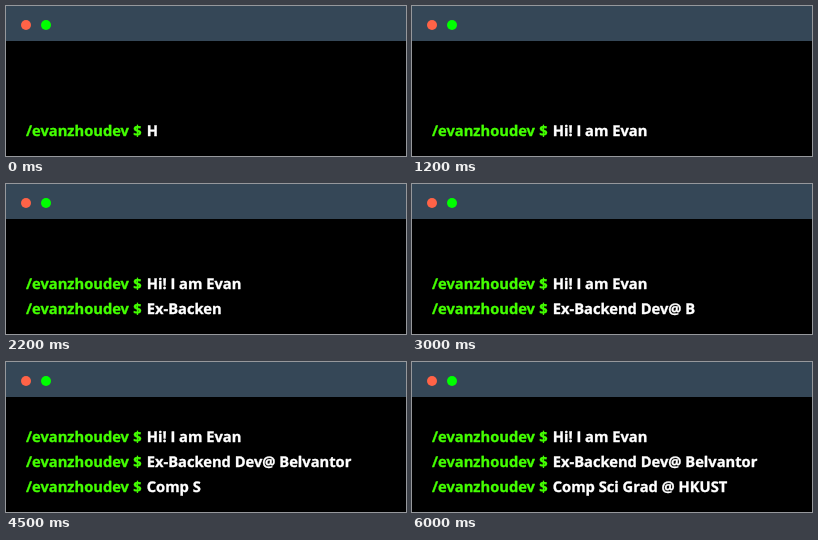
Recreate the animation shown at these times as an HTML page with a canvas. Size 400x150 px, loop 7200 ms.

```html
<!DOCTYPE html>
<html lang="en">
<head>
<meta charset="utf-8">
<title>Terminal</title>
<style>
  html, body { margin: 0; width: 100%; height: 100%; overflow: hidden; background: #000; }
  canvas { display: block; }
</style>
</head>
<body>
<canvas id="stage" width="400" height="150"></canvas>
<script>
const ctx = document.getElementById('stage').getContext('2d');

const LOOP = 7200;
const TICK = 100;
const LINE_HEIGHT = 25;
const BASELINE = 130;
const LINES = [
  'Hi! I am Evan',
  'Ex-Backend Dev@ Belvantor',
  'Comp Sci Grad @ HKUST'
];

function dot(x, color) {
  ctx.fillStyle = color;
  ctx.beginPath();
  ctx.arc(x, 19, 5, 0, Math.PI * 2);
  ctx.fill();
}

// A hairline outline gives the letters their heavier weight.
function write(text, x, y, color) {
  ctx.fillStyle = ctx.strokeStyle = color;
  ctx.fillText(text, x, y);
  ctx.strokeText(text, x, y);
}

// One character per tick, plus one idle tick at the end of each line.
function typedLines(tick) {
  const shown = [];
  let start = 0;
  for (const line of LINES) {
    if (tick < start) break;
    shown.push(line.slice(0, tick - start + 1));
    start += line.length + 1;
  }
  return shown;
}

function draw(time) {
  ctx.fillStyle = '#000';
  ctx.fillRect(0, 0, 400, 150);
  ctx.fillStyle = '#354757';
  ctx.fillRect(0, 0, 400, 35);
  dot(20, '#ff6347');
  dot(40, '#00ff00');

  ctx.font = '700 14.7px "Open Sans", "Noto Sans", sans-serif';
  ctx.textRendering = 'geometricPrecision';
  ctx.lineWidth = 0.35;
  ctx.lineJoin = 'round';
  const shown = typedLines(Math.floor(time / TICK));
  shown.forEach((text, i) => {
    const y = BASELINE - (shown.length - 1 - i) * LINE_HEIGHT;
    write('/evanzhoudev', 20, y, '#44ff00');
    write('$', 127.3, y, '#44ff00');
    write(text, 140.7, y, '#fff');
  });
}

const begin = performance.now();

function frame() {
  draw((performance.now() - begin) % LOOP);
  requestAnimationFrame(frame);
}

frame();
</script>
</body>
</html>
```
